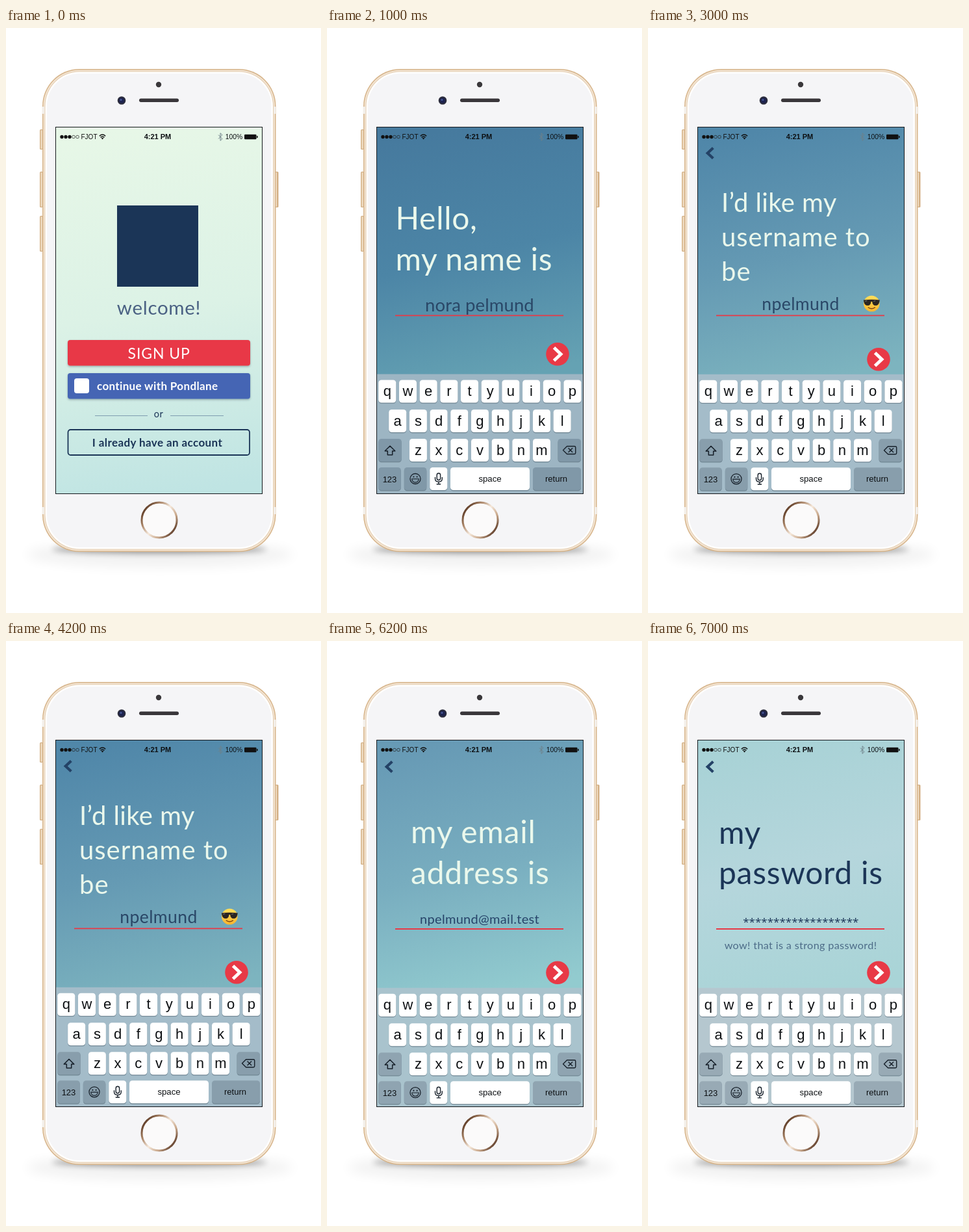
An HTML page that plays this animation: 485x900 px, repeating every 8000 ms.

```html
<!DOCTYPE html>
<html lang="en">
<head>
<meta charset="utf-8">
<title>Sign-up flow</title>
<style>
  html, body { margin: 0; width: 100%; height: 100%; overflow: hidden; background: #fff; }
  svg { display: block; width: 100%; height: 100%; }
  text { font-family: Lato, sans-serif; white-space: pre; }
  .sys { font-family: "Liberation Sans", Arial, sans-serif; }
  .stars { font-family: "Open Sans", sans-serif; }
  .mid { text-anchor: middle; }
</style>
</head>
<body>
<svg id="stage" viewBox="0 0 485 900" xmlns="http://www.w3.org/2000/svg"></svg>
<script>
const LOOP = 8000;
const NAVY = '#1b3557', RED = '#e83946', PALE = '#eaf8ec';

const text = (x, y, size, str, fill, attrs = '') =>
  `<text x="${x}" y="${y}" font-size="${size}" fill="${fill}" ${attrs}>${str}</text>`;
const sys = (x, y, size, str, attrs = '') =>
  text(x, y, size, str, '#0d1013', `class="sys mid" ${attrs}`);
const box = (x, y, w, h, r, fill, attrs = '') =>
  `<rect x="${x}" y="${y}" width="${w}" height="${h}" rx="${r}" fill="${fill}" ${attrs}/>`;
const dot = (x, y, r, fill, attrs = '') =>
  `<circle cx="${x}" cy="${y}" r="${r}" fill="${fill}" ${attrs}/>`;
const line = (d, stroke, width, attrs = '') =>
  `<path d="${d}" fill="none" stroke="${stroke}" stroke-width="${width}" ${attrs}/>`;
const spaced = (px, more = '') => `letter-spacing="${px}" ${more}`;
const gradient = (id, x1, y1, x2, y2, colors) =>
  `<linearGradient id="${id}" gradientUnits="userSpaceOnUse" x1="${x1}" y1="${y1}" x2="${x2}" y2="${y2}">` +
  colors.map((c, i) => `<stop offset="${i / (colors.length - 1)}" stop-color="${c}"/>`).join('') +
  '</linearGradient>';

function phone() {
  const sideButton = (x, y, h) => box(x, y, 6, h, 1.5, '#d3b085') + box(x + 1.5, y + 1, 2, h - 2, 1, '#f4e3cd');
  const bands = [121, 737].map(y => box(55.5, y, 5, 11, 0, '#f3efea') + box(410.5, y, 5, 11, 0, '#f3efea')).join('');
  return `
    <ellipse cx="237" cy="810" rx="205" ry="20" fill="#000" opacity=".05" filter="url(#blurWide)"/>
    <ellipse cx="236" cy="802" rx="165" ry="6" fill="#000" opacity=".42" filter="url(#blur)"/>
    ${sideButton(52, 156, 31)}${sideButton(52, 221, 55)}${sideButton(52, 289, 55)}${sideButton(413.5, 221, 55)}
    ${box(56, 63, 359.5, 743, 57, '#d6b48a')}
    ${box(57.5, 64.5, 356.5, 740, 55.5, '#f3e4d2')}
    ${bands}
    ${box(59.5, 66.5, 352.5, 736, 53.5, '#e3cdb1')}
    ${box(60.5, 67.5, 350.5, 734, 52.5, '#fff')}
    ${box(63, 70, 345.5, 729, 50, '#f5f5f7')}
    ${dot(235, 87, 4.2, '#3a383b')}
    ${box(205, 108.5, 61, 5.5, 2.75, '#39363a')}
    ${dot(178, 111.5, 6.3, '#2b2c3c')}${dot(178, 111.5, 4, '#1d2350')}${dot(177, 110.5, 1.5, '#4a5b98')}
    ${dot(236, 757, 27, '#fbfafa', 'stroke="url(#ring)" stroke-width="3"')}`;
}

function statusBar() {
  const signal = [0, 1, 2, 3, 4].map(i => i < 3
    ? dot(86 + 6 * i, 167.5, 2.7, '#111')
    : dot(86 + 6 * i, 167.5, 2.3, 'none', 'stroke="#222" stroke-width=".7"')).join('');
  return signal +
    text(115.5, 171, 10, 'FJOT', '#111', 'class="sys"') +
    line('M143.8 166.2Q148.5 161.8 153.2 166.2M145.6 168.4Q148.5 165.6 151.4 168.4', '#111', 1.5) +
    '<path d="M148.5 171.5l-1.8-2q1.8-1.5 3.6 0z" fill="#111"/>' +
    sys(233.5, 171, 11, '4:21 PM', 'font-weight="bold"') +
    line('M327 164.5l6 6-3 2.8v-11.6l3 2.8-6 6', '#6f8088', 1) +
    sys(351, 171, 10.3, '100%') +
    box(367, 163.8, 18.5, 7.4, 1.3, '#111') + box(386, 165.8, 1.6, 3.4, .8, '#111');
}

function keyboard(y, bg, dark) {
  const key = (x, row, w, fill = '#fff') =>
    box(x, y + row + 1.2, w, 35, 4.5, '#5f7482', 'opacity=".75"') + box(x, y + row, w, 35, 4.5, fill);
  const rows = [['qwertyuiop', 79.3, 9], ['asdfghjkl', 95.2, 54.5], ['zxcvbnm', 126.9, 99.5]];
  const letters = rows.map(([chars, left, top]) => [...chars].map((c, i) => {
    const x = left + 31.68 * i;
    return key(x, top, 27) + sys(x + 13.5, y + top + 24.5, 22, c);
  }).join('')).join('');
  const ink = '#17202a';
  return box(77, y, 317, 716 - y, 0, bg) + letters +
    key(79.3, 99.5, 35.5, dark) + key(355.5, 99.5, 35.5, dark) +
    key(79.3, 143.5, 34.5, dark) + key(118.8, 143.5, 34.5, dark) +
    key(158.3, 143.5, 27) + key(190, 143.5, 122) + key(317, 143.5, 74, dark) +
    sys(96.5, y + 166, 13, '123') + sys(251, y + 165.5, 13.2, 'space') + sys(353, y + 165.5, 13, 'return') +
    `<g transform="translate(0 ${y})">` +
      line('M97 110.5l7.8 7.8h-4.1v6h-7.4v-6h-4.1z', ink, 1.5, 'stroke-linejoin="round"') +
      line('M369.5 111h11.5q1.7 0 1.7 1.7v8.6q0 1.7-1.7 1.7h-11.5l-6-6zM371.5 113.7l6.6 6.6m0-6.6l-6.6 6.6', ink, 1.4, 'stroke-linejoin="round"') +
      dot(136, 161, 8, 'none', `stroke="${ink}" stroke-width="1.3"`) +
      dot(133.4, 158, 1.1, ink) + dot(138.6, 158, 1.1, ink) +
      line('M130.7 161.3h10.6a5.3 5.3 0 0 1-10.6 0z', ink, 1.1) +
      box(169.2, 152.5, 5.4, 10.5, 2.7, 'none', `stroke="${ink}" stroke-width="1.4"`) +
      line('M166.5 158.5v2.2q0 5 5.4 5t5.4-5v-2.2M171.9 165.7v3.5m-3.2 0h6.4', ink, 1.4) +
    '</g>';
}

const chevronBack = y => line(`M100.3 ${y - 8}l-8.6 8 8.6 8`, '#244266', 4.2);
const nextButton = y => dot(355, y, 17.8, RED) + line(`M349.5 ${y - 10}l10.5 10-10.5 10`, '#fff', 5);
const underline = y => line(`M105 ${y}H364`, RED, 1.8);

const coolFace = (x, y) => `<g transform="translate(${x} ${y})">
  ${dot(0, 0, 12.3, 'url(#face)')}
  <path d="M-12.5-5.5Q0-7 12.5-5.5L12-3Q11 3 6 3 1.5 3 .8-3H-.8Q-1.5 3-6 3-11 3-12-3z" fill="#2b2522"/>
  ${line('M-10-3.5l3-1M3-3.5l3-1', '#777', 1)}
  ${line('M-5 6Q0 9.6 5 6', '#7a4313', 1.5, 'stroke-linecap="round"')}
</g>`;

const welcome = () =>
  box(171, 273, 125, 125, 0, NAVY) +
  text(235.5, 441, 29.5, 'welcome!', '#4a6183', spaced(.7, 'class="mid"')) +
  `<g filter="url(#drop)">${box(95, 480, 281, 39.5, 4, RED)}${box(95, 531, 281, 39.5, 4, '#4565b4')}</g>` +
  text(235.7, 508.5, 23, 'SIGN UP', '#fff', spaced(.9, 'class="mid"')) +
  box(105, 539, 23, 23, 4, '#fff') +
  text(140, 557, 17, 'continue with Pondlane', '#fff', spaced(.35, 'font-weight="bold"')) +
  line('M137 596.5H218M253 596.5H335', '#7f9db0', 1) +
  text(235, 599, 14.5, 'or', NAVY, spaced(.4, 'class="mid"')) +
  box(95.5, 618, 279.5, 39, 4, 'none', `stroke="${NAVY}" stroke-width="1.8"`) +
  text(233, 643.5, 17, 'I already have an account', NAVY, spaced(.4, 'class="mid" font-weight="bold"'));

const askName = () =>
  text(105.5, 310, 48, 'Hello,', PALE, spaced(.7)) +
  text(105.5, 373, 48, 'my name is', PALE, spaced(.7)) +
  text(235, 436, 27.5, 'nora pelmund', '#2a4767', spaced(.1, 'class="mid"')) +
  underline(442.3) + nextButton(501.8) + keyboard(532.5, '#9db5c3', '#8098a8');

const askUser = () =>
  chevronBack(192.5) +
  text(113, 283, 40, 'I’d like my', PALE, spaced(.4)) +
  text(113, 336, 40, 'username to', PALE, spaced(1)) +
  text(113, 389, 40, 'be', PALE, spaced(1)) +
  text(235, 433.5, 26.5, 'npelmund', '#2a4767', spaced(.4, 'class="mid"')) +
  coolFace(344.3, 424) + underline(442.3) + nextButton(509.7) + keyboard(532.8, '#a4bcc9', '#889eac');

const askEmail = () =>
  chevronBack(193.5) +
  text(129, 311, 48, 'my email', PALE, spaced(.8)) +
  text(129, 374, 48, 'address is', PALE, spaced(.8)) +
  text(235, 435, 20, 'npelmund@mail.test', '#27446a', spaced(.3, 'class="mid"')) +
  underline(443) + nextButton(510.3) + keyboard(533.7, '#a9c3cd', '#8fa4b1');

const askPassword = () =>
  chevronBack(193.5) +
  text(109, 311.5, 48, 'my', NAVY, spaced(.7)) +
  text(109, 374, 48, 'password is', NAVY, spaced(.7)) +
  text(235.3, 437.5, 17, '*'.repeat(19), NAVY, 'class="stars mid"') +
  underline(443) +
  text(235, 473.5, 16.2, 'wow! that is a strong password!', '#4d6c88', spaced(.35, 'class="mid"')) +
  nextButton(510.3) + keyboard(533.7, '#b5c7cf', '#98aab5');

const scenes = [
  { start: 0, draw: welcome, bg: ['#e7f7e7', '#dcf2e6', '#bfe4e3'], y2: 716 },
  { start: 1000, draw: askName, bg: ['#467a9e', '#4c85a6', '#65a2b3'], y2: 540 },
  { start: 3000, draw: askUser, bg: ['#5087a9', '#6499b3', '#7db4bf'], y2: 540 },
  { start: 5000, draw: askEmail, bg: ['#679ab5', '#78adbf', '#92cbcf'], y2: 540 },
  { start: 7000, draw: askPassword, bg: ['#a8d2d6', '#b5d6dc', '#a9d4d7'], y2: 540 },
];

const stage = document.getElementById('stage');
stage.innerHTML = `<defs>
  <filter id="blur" x="-20%" y="-200%" width="140%" height="500%"><feGaussianBlur stdDeviation="5"/></filter>
  <filter id="blurWide" x="-20%" y="-100%" width="140%" height="300%"><feGaussianBlur stdDeviation="9"/></filter>
  <filter id="drop" x="-5%" y="-10%" width="110%" height="130%"><feDropShadow dx="0" dy="1.5" stdDeviation="1.5" flood-color="#345" flood-opacity=".4"/></filter>
  ${gradient('ring', 212, 738, 260, 776, ['#55331f', '#a98466', '#f6e9dc', '#c9a88b', '#54321f'])}
  ${gradient('face', 0, -12, 0, 12, ['#ffdf5c', '#f9b52f'])}
  ${scenes.map((s, i) => gradient('bg' + i, 190, 153, 280, s.y2, s.bg)).join('')}
</defs>
${phone()}
${scenes.map((s, i) => `<g class="scene">${box(77, 153, 317, 563, 0, `url(#bg${i})`)}${s.draw()}</g>`).join('')}
${statusBar()}
${box(76.5, 152.5, 318, 564, 0, 'none', 'stroke="#15191d" stroke-width="1"')}`;

// Each scene is opaque and covers the ones before it until the loop restarts.
document.querySelectorAll('.scene').forEach((el, i) => {
  const { start } = scenes[i];
  if (start === 0) return;
  el.animate([
    { offset: 0, opacity: 0, easing: 'steps(1, end)' },
    { offset: start / LOOP, opacity: 1 },
    { offset: 1, opacity: 1 },
  ], { duration: LOOP, iterations: Infinity });
});
</script>
</body>
</html>
```
